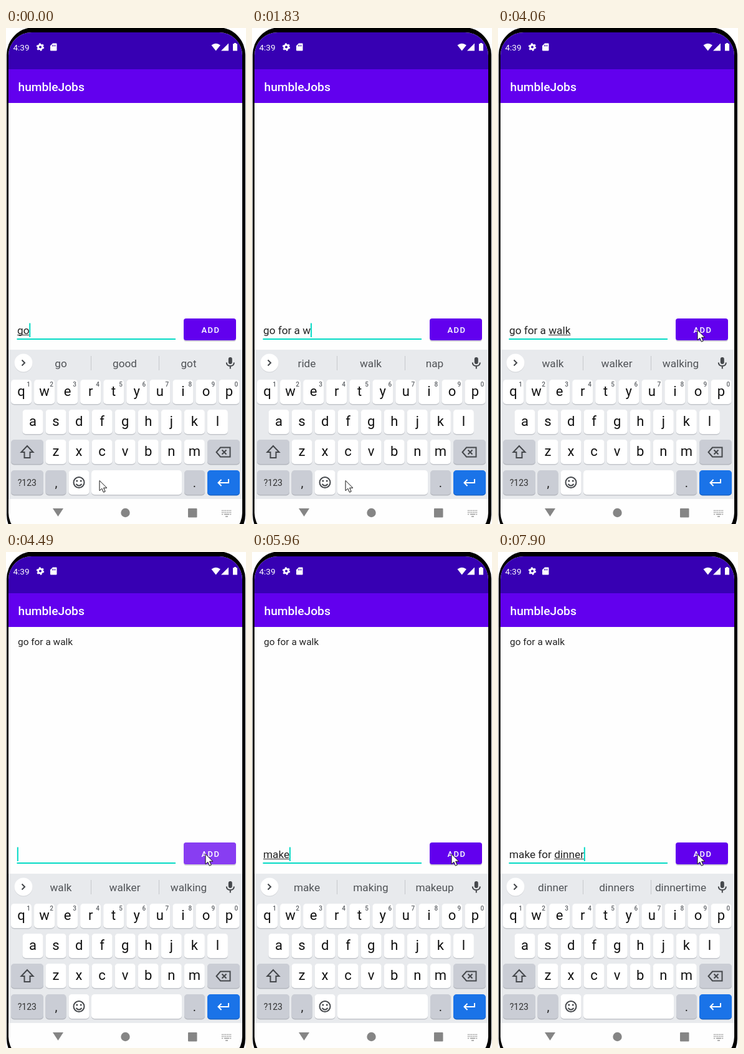
An HTML page for the animation above (8000 ms loop, 385 by 794 pixels).

```html
<!DOCTYPE html>
<html lang="en">
<head>
<meta charset="utf-8">
<title>To-do list</title>
<style>
html, body { margin: 0; width: 100%; height: 100%; overflow: hidden; background: #fff; }
svg { display: block; width: 385px; height: 794px; font-family: Roboto, sans-serif; }
text { white-space: pre; }
.mid { text-anchor: middle; }
.line { fill: none; stroke: #45484c; stroke-width: 2; }
.word { font-size: 17.2px; fill: #505357; text-anchor: middle; }
.key { font-size: 22px; fill: #111; text-anchor: middle; }
.hint { font-size: 10px; font-weight: 500; fill: #5f6368; text-anchor: middle; }
</style>
</head>
<body>
<svg viewBox="0 0 385 794">
  <defs>
    <clipPath id="screen"><rect x="4" y="7" width="375" height="806" rx="37"/></clipPath>
    <clipPath id="button"><rect x="285" y="465" width="84" height="35" rx="4"/></clipPath>
  </defs>
  <rect x="1" y="-1" width="383" height="824" rx="44" fill="#000"/>
  <g clip-path="url(#screen)">
    <rect y="7" width="385" height="790" fill="#fefefe"/>
    <rect y="7" width="385" height="59" fill="#3700b3"/>
    <rect y="66" width="385" height="54" fill="#6200ee"/>
    <g fill="#fff">
      <text x="11.500" y="36" font-size="13.5">4:39</text>
      <circle cx="55" cy="30.500" r="3.400" fill="none" stroke="#fff" stroke-width="2.800"/>
      <circle cx="55" cy="30.500" r="5.200" fill="none" stroke="#fff" stroke-width="2" stroke-dasharray="2.720"/>
      <path d="M75 24.500h5.500q1 0 1 1v10q0 1-1 1h-8.500q-1 0-1-1v-7z"/>
      <path d="M74.500 27v2.500M76.700 27v2.500M78.900 27v2.500" stroke="#3700b3"/>
      <path d="M329.500 27.500q7.200-5.500 14.400 0l-7.200 9z"/>
      <path d="M357 24.500v12h-12z"/>
      <path d="M366 24h3v1.300h2v11.200h-7v-11.200h2z"/>
      <text x="19.500" y="101" font-size="19.2" font-weight="500">humbleJobs</text>
    </g>

    <text id="item" x="19" y="149" font-size="15.4" fill="#222">go for a walk</text>

    <text id="entry" x="18" y="490" font-size="17.2" fill="#222"></text>
    <rect id="under" y="491" height="1" fill="#333"/>
    <rect id="caret" y="472.500" width="2" height="22.500" fill="#03dac5"/>
    <rect x="17.500" y="497" width="254.500" height="2" fill="#03dac5"/>

    <rect x="285" y="466" width="84" height="36" rx="4" fill="#d5d5d8"/>
    <rect x="285" y="465" width="84" height="35" rx="4" fill="#6200ee"/>
    <circle id="ripple" cx="320" cy="483" clip-path="url(#button)" fill="#fff" opacity=".24"/>
    <text x="313.500" y="488" font-size="13" font-weight="500" letter-spacing="1.4" fill="#fff">ADD</text>

    <rect y="515" width="385" height="239" fill="#e8eaed"/>
    <circle cx="28" cy="537" r="14.500" fill="#d0d2d6"/>
    <circle cx="28" cy="536" r="14.500" fill="#fff"/>
    <path id="chevron" class="line" d="M-2.500-4.500L2-0L-2.500 4.500"/>
    <g id="words">
      <path d="M136.500 525v23M245.500 525v23" stroke="#c6c8cc"/>
      <text class="word" x="88" y="543"></text>
      <text class="word" x="190.500" y="543"></text>
      <text class="word" x="293" y="543"></text>
    </g>
    <g id="tools" class="line" stroke-width="1.800">
      <circle cx="76" cy="534" r="5"/>
      <path d="M79.700 537.700l6 6"/>
      <path d="M126 529h10q2 0 2 2v7l-5 5h-7q-2 0-2-2v-10q0-2 2-2zM138 538h-5v5M127 537q2 3 5 1"/>
      <path d="M128 532v2.500M134 532v2.500"/>
      <text x="184" y="541" class="mid" font-size="14" font-weight="900" fill="#45484c" stroke="none">GIF</text>
      <rect x="232.500" y="529.500" width="13" height="14" rx="1"/>
      <path d="M235.500 531h7" stroke-width="4"/>
      <path d="M235.500 535.500h7M235.500 539h5" stroke-width="1.500"/>
      <path d="M272.500 525v23" stroke="#c6c8cc" stroke-width="1"/>
      <path d="M300 536.500h.01M306 536.500h.01M312 536.500h.01" stroke-width="4" stroke-linecap="round"/>
    </g>
    <rect x="356.800" y="527" width="6" height="11" rx="3" fill="#45484c"/>
    <path class="line" stroke-width="1.800" d="M353.800 535.500q0 5.500 6 5.500t6-5.500M359.800 541v4.500"/>

    <g id="keys"></g>
    <path class="line" d="M34 669l-9.500 10h5v9h9v-9h5z"/>
    <path class="line" d="M344 671.500h15.500v15h-15.500l-6.500-7.500zM346.500 675.500l7 7M353.500 675.500l-7 7"/>
    <text x="33.800" y="733" class="mid" font-size="14" fill="#333">?123</text>
    <text x="80.500" y="735" class="mid" font-size="20" fill="#222">,</text>
    <text x="302.500" y="735" class="mid" font-size="20" fill="#222">.</text>
    <circle class="line" cx="117" cy="727.500" r="8.500"/>
    <path class="line" d="M112.500 730q4.500 5.500 9 0"/>
    <circle cx="113.800" cy="725" r="1.500" fill="#45484c"/>
    <circle cx="120.200" cy="725" r="1.500" fill="#45484c"/>
    <path class="line" style="stroke:#fff" d="M357 722v6h-16M345.500 723l-5 5l5 5"/>

    <g fill="#858585">
      <path d="M75 769h17l-8.500 13z"/>
      <circle cx="191.500" cy="776" r="7.200"/>
      <rect x="292" y="769" width="14.500" height="14.500" rx="1"/>
      <path d="M346 772.500h16M346 775.500h16M346 778.500h3M359 778.500h3" stroke="#999" stroke-width="1.700" stroke-dasharray="1.700 1"/>
      <path d="M350 778.500h8M352 782h4" stroke="#999" stroke-width="1.700"/>
    </g>
  </g>
  <path id="mouse" d="M0 0v16.200l3.800-3.500l2.600 6l2.800-1.200l-2.600-5.800h5.200z" fill="#fff" stroke="#111"/>
</svg>
<script>
const $ = id => document.getElementById(id);

// Keyboard
const KEY = 33, PITCH = 37.05;
let keys = '';
function key(x, y, w, fill = '#fff', edge = '#c3c6cb') {
  keys += `<rect x="${x}" y="${y + 1}" width="${w}" height="39.500" rx="5" fill="${edge}"/>` +
          `<rect x="${x}" y="${y}" width="${w}" height="39" rx="5" fill="${fill}"/>`;
}
function row(letters, x, y, hints = '') {
  [...letters].forEach((c, i) => {
    const left = x + i * PITCH, mid = left + KEY / 2;
    key(left, y, KEY);
    keys += `<text class="key" x="${mid}" y="${y + 26}">${c}</text>`;
    if (hints) keys += `<text class="hint" x="${mid + 11.5}" y="${y + 11}">${hints[i]}</text>`;
  });
}
const GREY = '#cacdd5', GREY_EDGE = '#b4b7be';
row('qwertyuiop', 8, 563, '1234567890');
row('asdfghjkl', 26.5, 611);
row('zxcvbnm', 63.5, 659);
key(8, 659, 52, GREY, GREY_EDGE);
key(323, 659, 52, GREY, GREY_EDGE);
key(8, 708, 52, GREY, GREY_EDGE);
key(63.5, 708, KEY, GREY, GREY_EDGE);
key(100.5, 708, KEY);
key(137, 708, 145);
key(286, 708, KEY, GREY, GREY_EDGE);
key(323, 708, 52, '#1a73e8', '#1862c4');
$('keys').innerHTML = keys;

// Typing: [time, text, suggestions]; _ marks the underlined word, | the caret
const LOOP = 8000;
const steps = [
  [0, '_go|', 'go good got'],
  [120, '_go |'],
  [380, 'go |', 'to for on'],
  [750, 'go f|'],
  [890, 'go fo|'],
  [1020, 'go _for|', 'for four forever'],
  [1160, 'go _for |'],
  [1300, 'go for |', 'a the it'],
  [1430, 'go for a|'],
  [1570, 'go for a |'],
  [1710, 'go for a |', 'ride walk nap'],
  [1830, 'go for a w|'],
  [2080, 'go for a wa|', 'was walk want'],
  [2220, 'go for a wal|'],
  [2350, 'go for a walk|', 'wall walk wallet'],
  [2630, 'go for a _walk|', 'walk walker walking'],
  [3130, 'go for a _walk'],
  [3670, 'go for a _walk|'],
  [4060, 'go for a _walk'],
  [4470, '|'],
  [4620, '|', ''],
  [5020, ''],
  [5300, 'm|'],
  [5450, 'ma|'],
  [5580, 'mak|', 'me my man'],
  [5720, 'make|'],
  [5900, '_make|', 'make making makeup'],
  [6040, '_make |'],
  [6210, 'make |', 'sure it a'],
  [6360, 'make f|'],
  [6490, 'make _for|', 'for forward forgot'],
  [6630, 'make _for |'],
  [6780, 'make for |', 'the a dinner'],
  [6940, 'make for d|'],
  [7080, 'make for di|'],
  [7220, 'make for din|', 'din dinner dinners'],
  [7350, 'make for dinn|', 'dinn dinner dinners'],
  [7470, 'make for dinne|'],
  [7590, 'make for dinner|', 'dinne dinner dinners'],
  [7900, 'make for _dinner|', 'dinner dinners dinnertime']
];
steps.forEach((s, i) => { s[2] ??= steps[i - 1][2]; });

const pen = document.createElement('canvas').getContext('2d');
function width(text) {
  pen.font = '17.2px Roboto, sans-serif';
  return pen.measureText(text).width;
}
const show = (el, on) => el.setAttribute('visibility', on ? 'visible' : 'hidden');
const slots = document.querySelectorAll('.word');

function drawEntry([, raw, hints]) {
  const text = raw.replace(/[_|]/g, '');
  const from = raw.indexOf('_');
  $('entry').textContent = text;
  show($('caret'), raw.includes('|'));
  $('caret').setAttribute('x', 17.8 + width(text));
  show($('under'), from >= 0);
  if (from >= 0) {
    const left = width(text.slice(0, from));
    $('under').setAttribute('x', 18 + left);
    $('under').setAttribute('width', width(text.trimEnd()) - left);
  }
  show($('words'), hints);
  show($('tools'), !hints);
  hints.split(' ').forEach((w, i) => { slots[i].textContent = w; });
  $('chevron').setAttribute('transform', `translate(28 536) scale(${hints ? 1 : -1} 1)`);
}

function drawMouse(t) {
  const p = Math.min(6, Math.max(0, Math.floor((t - 3280) / 130) + 1)) / 6;
  const e = p * p * (3 - 2 * p);
  $('mouse').setAttribute('transform', `translate(${150 + 170 * e} ${724.5 - 241 * e})`);
}

const start = performance.now();
function frame() {
  const t = (performance.now() - start) % LOOP;
  drawEntry(steps.findLast(s => s[0] <= t));
  drawMouse(t);
  show($('item'), t >= 4470);
  show($('ripple'), t >= 4320 && t < 4620);
  $('ripple').setAttribute('r', t < 4470 ? 24 : 60);
  requestAnimationFrame(frame);
}
frame();
</script>
</body>
</html>
```
